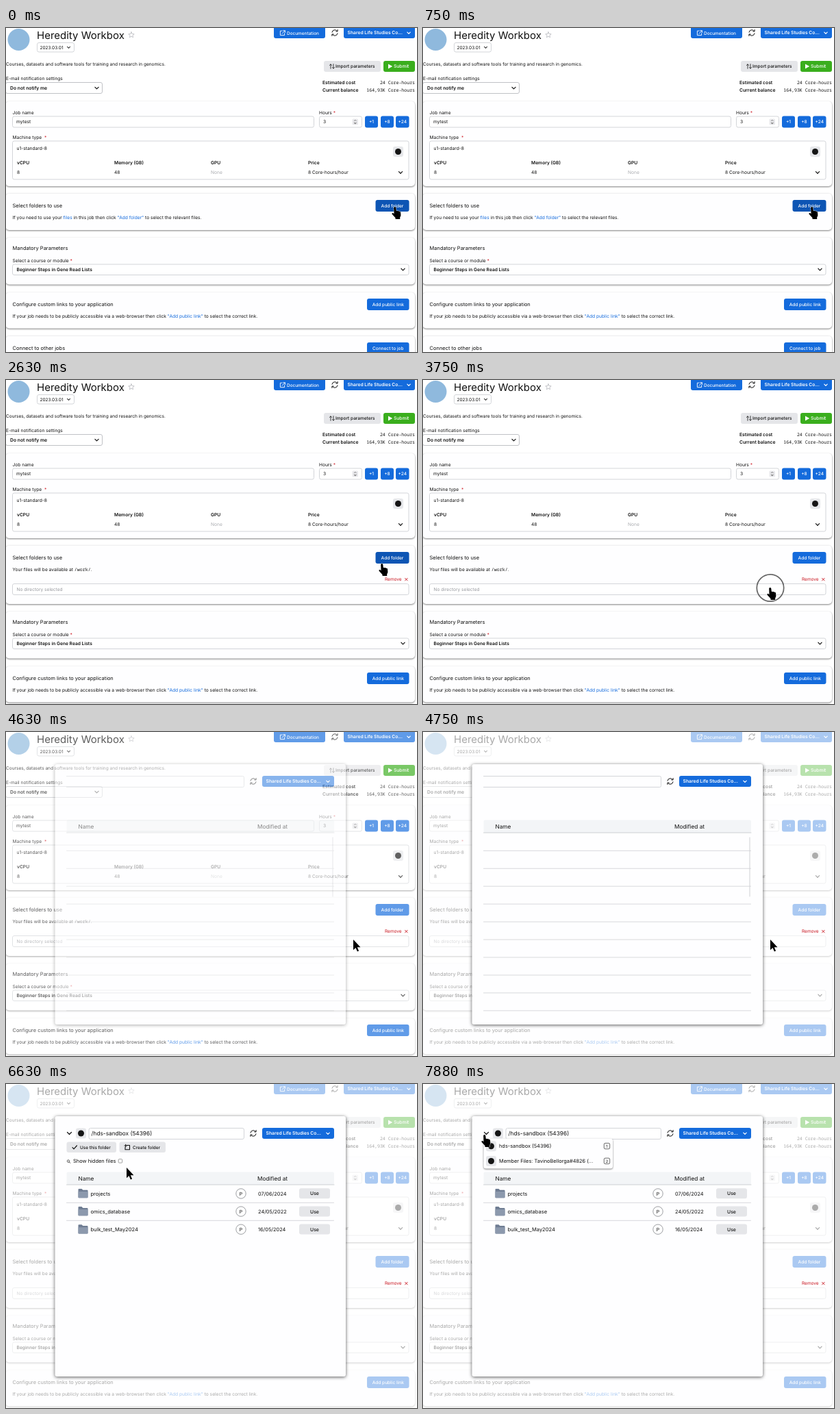
An HTML page that plays this animation: 600x473 px, repeating every 8 s.

```html
<!DOCTYPE html>
<html lang="en">
<head>
<meta charset="utf-8">
<title>Add a folder to a job</title>
<style>
html, body { margin: 0; width: 100%; height: 100%; overflow: hidden; background: #fff; }
svg { display: block; width: 100%; height: 100%; }
text { font-family: Inter, "Open Sans", sans-serif; white-space: pre; text-rendering: geometricPrecision; }
.mono { font-family: "Noto Sans Mono", "DejaVu Sans Mono", monospace; }
.card { filter: drop-shadow(0 1px 1.3px rgba(0,0,0,.5)); }
.dialog { filter: drop-shadow(0 1px 2.5px rgba(0,0,0,.65)); }
</style>
</head>
<body>
<svg id="stage" viewBox="0 0 600 473" xmlns="http://www.w3.org/2000/svg"></svg>
<script>
const LOOP = 8000, STEP = 125, SHIFT = 32;
const BLUE = '#146bdc', DARK_BLUE = '#0d55b4', INK = '#111', RED = '#c8141e';
const TEAM = 'Shared Life Studies Co...';

// Drawing helpers; each returns SVG markup
const text = (x, y, s, size = 6.65, { fill = INK, weight = 400, anchor = 'start', cls = '' } = {}) =>
  `<text x="${x}" y="${y}" font-size="${size}" fill="${fill}" font-weight="${weight}" text-anchor="${anchor}" class="${cls}">${s}</text>`;
const bold = (x, y, s, size = 6.7) => text(x, y, s, size, { weight: 600 });
const mono = (x, y, s) => text(x, y, s, 6.55, { anchor: 'end', cls: 'mono' });
const box = (x, y, x2, y2, fill, r = 3, extra = '') =>
  `<rect x="${x}" y="${y}" width="${x2 - x}" height="${y2 - y}" rx="${r}" fill="${fill}" ${extra}/>`;
const field = (x, y, x2, y2, stroke = '#cfd1d5') =>
  box(x + .5, y + .5, x2 - .5, y2 - .5, '#fff', 2.5, `stroke="${stroke}" stroke-width=".9"`);
const line = (d, stroke = INK, width = 1, extra = '') =>
  `<path d="${d}" fill="none" stroke="${stroke}" stroke-width="${width}" stroke-linecap="round" stroke-linejoin="round" ${extra}/>`;
const shape = (d, fill, extra = '') => `<path d="${d}" fill="${fill}" ${extra}/>`;
const dot = (x, y, r, fill, extra = '') => `<circle cx="${x}" cy="${y}" r="${r}" fill="${fill}" ${extra}/>`;
const group = (id, inner, extra = '') => `<g id="${id}" ${extra}>${inner}</g>`;
const chevron = (x, y, color = INK, s = 2.6) =>
  line(`M${x - s} ${y - s / 2}l${s} ${s}l${s} ${-s}`, color, 1.2);
const button = (x, y, x2, y2, label, id = '') =>
  box(x, y, x2, y2, BLUE, 3, id && `id="${id}"`) +
  text((x + x2) / 2, (y + y2) / 2 + 2.4, label, 6.55, { fill: '#fff', weight: 500, anchor: 'middle' });
const card = (y, y2) => box(-.5, y, 597, y2, '#fefeff', 5, 'class="card"');
const link = s => `<tspan fill="${BLUE}">${s}</tspan>`;
const star = '<tspan fill="#d0202a"> *</tspan>';
const refresh = (x, y) =>
  line(`M${x - 4} ${y - .8}a4.1 4.1 0 0 1 7.4 -1.7m.7 -2v2.4h-2.4M${x + 4} ${y + .8}a4.1 4.1 0 0 1 -7.4 1.7m-.7 2v-2.4h2.4`, INK, 1);
const provider = (x, y) => box(x - 7.5, y - 7.5, x + 7.5, y + 7.5, '#e6e7ea') + dot(x, y, 4.5, '#151515');
const teamButton = (x, y, x2, y2) => box(x, y, x2, y2, BLUE) +
  text(x + 5.5, y2 - 5.8, TEAM, 6.75, { fill: '#fff', weight: 600 }) + chevron(x2 - 9, y2 - 7.8, '#fff', 2.2);

function header() {
  const starPath = Array.from({ length: 10 }, (_, i) => {
    const a = i * Math.PI / 5, r = i % 2 ? 2 : 4.4;
    return `${i ? 'L' : 'M'}${183 + r * Math.sin(a)} ${10.2 - r * Math.cos(a)}`;
  }).join('') + 'Z';
  return dot(18.5, 17, 16, '#8fb9dd') +
    text(45, 15.5, 'Heredity Workbox', 15) +
    line(starPath, '#b5b7bb', .8) +
    field(45, 21, 100, 35.5) + text(49.5, 30.6, '2023.03.01', 6.5) + chevron(91.5, 28.3, '#444', 2) +
    box(391, -4, 466, 15, BLUE) +
    line('M403 4.2h-2.6v6.4h6.2v-2.8M403 8.2l4.2 -4.2m-2.6 -.2h2.8v2.8', '#fff', .9) +
    text(410, 9.5, 'Documentation', 6.45, { fill: '#fff', weight: 500 }) +
    refresh(480, 7) + teamButton(493, -4, 597, 15) +
    text(0, 55, 'Courses, datasets and software tools for training and research in genomics.', 6.53) +
    box(464, 48, 547, 64, '#e5e6e9') +
    line('M474 59.3v-6.4m-1.6 1.6l1.6 -1.6l1.6 1.6M478 52.7v6.4m-1.6 -1.6l1.6 1.6l1.6 -1.6', INK, .8) +
    text(481, 58.4, 'Import parameters', 6.5, { weight: 500 }) +
    box(551, 48, 597, 64, '#3aae1d') + shape('M558 52.5l6.2 3.5l-6.2 3.5Z', '#fff') +
    text(566, 58.4, 'Submit', 6.7, { fill: '#fff', weight: 500 }) +
    text(0, 76, 'E-mail notification settings', 6.6) +
    field(-1, 79, 141, 96, '#b9bbc0') + bold(6, 90, 'Do not notify me', 6.8) + chevron(132.5, 87.6) +
    bold(462, 81.5, 'Estimated cost', 6.75) + mono(597, 81.5, '24 Core-hours') +
    bold(462, 92.7, 'Current balance', 6.75) + mono(597, 92.7, '164,93K Core-hours');
}

function machineCard() {
  const columns = [[16, 'vCPU', '8'], [158, 'Memory (GB)', '48'], [299, 'GPU', 'None'], [441, 'Price', '8 Core-hours/hour']];
  return card(107, 231) +
    text(9.5, 126, 'Job name') + field(9, 128.5, 450, 145.5) + text(15, 139, 'mytest') +
    text(457, 126, 'Hours' + star) + field(457, 128.5, 520, 145.5) + text(463, 139.2, '3') +
    box(505.5, 132.5, 514, 141.5, '#e9e9ec', 1.5) + chevron(509.8, 139, '#777', 1.3) +
    line('M508.5 135.6l1.3 -1.3l1.3 1.3', '#777', 1) +
    button(524, 128.5, 543, 145.5, '+1') + button(547, 128.5, 566, 145.5, '+8') + button(569, 128.5, 588.5, 145.5, '+24') +
    text(9.5, 161.7, 'Machine type ' + star) + field(9, 164.5, 588.5, 221.5) +
    text(15.5, 177.7, 'u1-standard-8') + provider(572.5, 180.5) +
    columns.map(([x, name, value]) => bold(x, 198.8, name) +
      text(x, 213, value, 6.65, { fill: value == 'None' ? '#aaacb0' : INK })).join('') +
    chevron(576, 211);
}

function folderCards() {
  return group('foldersEmpty', card(241.5, 295) +
      text(9.5, 279, `If you need to use your ${link('files')} in this job then click ${link('"Add folder"')} to select the relevant files.`)) +
    group('foldersOpen', card(241.5, 295 + SHIFT) +
      text(9.5, 279, 'Your files will be available at <tspan class="mono">/work/</tspan>.') +
      field(9, 297, 588.5, 314) + text(15.5, 308, 'No directory selected', 6.6, { fill: '#97999e' })) +
    text(9.5, 262, 'Select folders to use', 7.5) +
    button(539.5, 251, 588.5, 268, 'Add folder', 'addFolder');
}

function lowerCards() {
  return card(306, 374.5) + text(9.5, 324, 'Mandatory Parameters', 7.5) +
    text(9.5, 342, 'Select a course or module' + star) +
    field(9, 344.5, 588.5, 361) + bold(15.5, 355.3, 'Beginner Steps in Gene Read Lists', 6.7) + chevron(579.5, 352.5) +
    card(386, 438.5) + text(9.5, 406, 'Configure custom links to your application', 7.4) +
    button(527, 395, 588.5, 412, 'Add public link') +
    text(9.5, 422.7, `If your job needs to be publicly accessible via a web-browser then click ${link('"Add public link"')} to select the correct link.`) +
    card(449.5, 500) + text(9.5, 470, 'Connect to other jobs', 7.5) +
    button(527, 459, 588.5, 476, 'Connect to job');
}

function folderRow([name, date], i) {
  const y = 160 + 26.1 * i;
  return shape(`M105.5 ${y - 6}q0 -1 1 -1h4l1.8 1.8h6.2q1 0 1 1v9.4q0 1 -1 1h-12q-1 0 -1 -1Z`, '#6f7d93') +
    shape(`M105.5 ${y - 3}h14v8.2q0 1 -1 1h-12q-1 0 -1 -1Z`, '#8c99ad') +
    text(123.5, y + 2.6, name, 7.55) +
    dot(343, y, 7.2, '#fff', 'stroke="#85878c" stroke-width=".8"') + text(343, y + 2.6, 'P', 7, { anchor: 'middle' }) +
    text(368, y + 2.6, date, 7.4) +
    box(428, y - 7.7, 473, y + 7.3, '#e5e6e9') + text(450.5, y + 2.4, 'Use', 6.9, { weight: 500, anchor: 'middle' });
}

function dialog() {
  const rule = y => line(`M88.5 ${y}H478.5`, '#d4d5d8', .9);
  const rules = Array.from({ length: 10 }, (_, i) => rule(173.3 + 25.95 * i)).join('');
  const folders = [['projects', '07/06/2024'], ['omics_database', '24/05/2022'], ['bulk_test_May2024', '16/05/2024']];
  return box(71.5, 47, 496, 427, '#fefeff', 3, 'class="dialog"') +
    refresh(361, 72) + teamButton(374, 64, 479, 80) +
    box(88.5, 128.5, 479, 147, '#f3f5f7', 2) + line('M88.5 147H479', '#c8cacd', .9) +
    text(105.5, 140.8, 'Name', 8.2) + text(367, 140.8, 'Modified at', 8.25) +
    group('loading', line('M88.5 64.5H345.5q2 0 2 2v12q0 2 -2 2H88.5', '#cfd1d5', .9) + rules + line('M477 154V240', '#cfd0d4', 1)) +
    group('loaded', chevron(92.5, 72, INK, 3) + provider(109.5, 72) +
      field(120.5, 64, 348, 81) + text(124.5, 75.2, '/hds-sandbox (54396)', 8.3) +
      box(88.5, 84.5, 161, 100, '#e5e6e9') + line('M97 92.6l2 2.2l4.4 -4.8', INK, 1.2) +
      text(108, 94.8, 'Use this folder', 6.45, { weight: 500 }) +
      box(165.5, 84.5, 233, 100, '#e5e6e9') +
      line('M176.5 89.5h4v6.3h-6.5v-3.6M173 90h3.4m-1.7 -1.7v3.4', INK, 1.1) +
      text(185, 94.8, 'Create folder', 6.4, { weight: 500 }) +
      dot(91, 112.6, 1.7, 'none', 'stroke="#333" stroke-width=".8"') + line('M92.3 113.9l1.4 1.5', '#333', .9) +
      text(98, 115.2, 'Show hidden files', 7.45) + box(164.2, 109.7, 169.6, 115.1, '#fff', 1, 'stroke="#777" stroke-width=".7"') +
      rule(173.3) + rule(199.3) + folders.map(folderRow).join(''));
}

function menu() {
  const item = (y, label, key) => provider(99.5, y) + text(111, y + 2.7, label, 7.4) +
    box(264.3, y - 4.3, 272.7, y + 4.1, '#fff', 1.8, 'stroke="#444" stroke-width=".8"') +
    text(268.5, y + 2, key, 5.8, { anchor: 'middle' });
  return box(88.5, 79.5, 277, 123.5, '#fefeff', 3.5, 'class="card"') +
    item(90.7, 'hds-sandbox (54396)', 1) + item(112.5, 'Member Files: TavinoBellorga#4826 (...', 2);
}

const stage = document.getElementById('stage');
const outline = 'stroke="#fff" stroke-width=".9" paint-order="stroke"';
stage.innerHTML = box(0, 0, 600, 473, '#fff', 0) + header() + machineCard() + folderCards() +
  group('lower', lowerCards()) +
  box(0, 0, 600, 473, '#fff', 0, 'id="veil"') +
  group('remove', text(553, 293.2, 'Remove', 6.5, { fill: RED }) + line('M582.6 289.3l3.6 3.6m0 -3.6l-3.6 3.6', RED, .9)) +
  group('dialog', dialog()) + group('menu', menu()) +
  dot(507, 303.5, 0, 'none', 'id="ring" stroke="#333" stroke-width="1.7"') +
  group('cursor',
    shape('M-1.8 1.6Q-1.8 0 -.3 0T1.3 1.6L1.9 6.2Q2.6 5.4 3.8 6.3Q5 5.6 6 6.8Q7.6 6.4 8 8L8.4 12Q8.4 14 7.2 15.2V18H.6L.4 16L-4.2 11Q-5.3 9.4 -3.8 8.9Q-2.7 8.8 -1.5 10.2Z', '#000', `id="hand" ${outline}`) +
    shape('M0 0V15.3L3.5 12.1L5.9 17.4L8.1 16.4L5.8 11.2H10.5Z', '#000', `id="arrow" ${outline}`));

const parts = {};
stage.querySelectorAll('[id]').forEach(el => parts[el.id] = el);
const show = (id, on) => parts[id].setAttribute('visibility', on ? 'visible' : 'hidden');
const set = (id, name, value) => parts[id].setAttribute(name, value);

// Pointer stops: step, x, y, ease-out power used to reach the stop
const stops = [[0, 568, 261, 1], [20, 568, 261, 1], [21, 549, 268, 1], [26, 507, 303, 1.6], [45, 507, 303, 1],
  [52, 194, 174, 1], [53, 176, 122, 1], [59, 90, 74, 1.8], [64, 90, 74, 1]];

function pointer(k) {
  const i = stops.findIndex(s => s[0] > k);
  const [k0, x0, y0] = stops[i - 1], [k1, x1, y1, power] = stops[i];
  const p = 1 - (1 - (k - k0) / (k1 - k0)) ** power;
  return [x0 + (x1 - x0) * p, y0 + (y1 - y0) * p];
}

function draw(t) {
  const k = Math.floor(t / STEP);
  const open = k >= 17, modal = k >= 37, ready = k >= 40;
  show('foldersEmpty', !open);
  show('foldersOpen', open);
  show('remove', open);
  set('lower', 'transform', `translate(0 ${open ? SHIFT : 0})`);
  set('addFolder', 'fill', k < 22 ? DARK_BLUE : BLUE);

  const fade = k == 37 ? .5 : modal ? 1 : 0;
  set('veil', 'opacity', .64 * fade);
  set('dialog', 'opacity', fade);
  show('loading', !ready);
  show('loaded', ready);
  show('menu', k >= 61);

  const ringing = k >= 29 && k < 32;
  show('ring', ringing);
  if (ringing) {
    set('ring', 'r', [4, 19.7, 51.5][k - 29]);
    set('ring', 'opacity', [.9, .75, .3][k - 29]);
  }

  const [x, y] = pointer(k);
  const hand = k < 22 || (k < 34 && y > 296) || (k > 53 && x < 160 && y < 100);
  set('cursor', 'transform', `translate(${x} ${y})`);
  show('hand', hand);
  show('arrow', !hand);
}

const start = performance.now();
function tick() {
  draw((performance.now() - start) % LOOP);
  requestAnimationFrame(tick);
}
draw(0);
requestAnimationFrame(tick);
</script>
</body>
</html>
```
